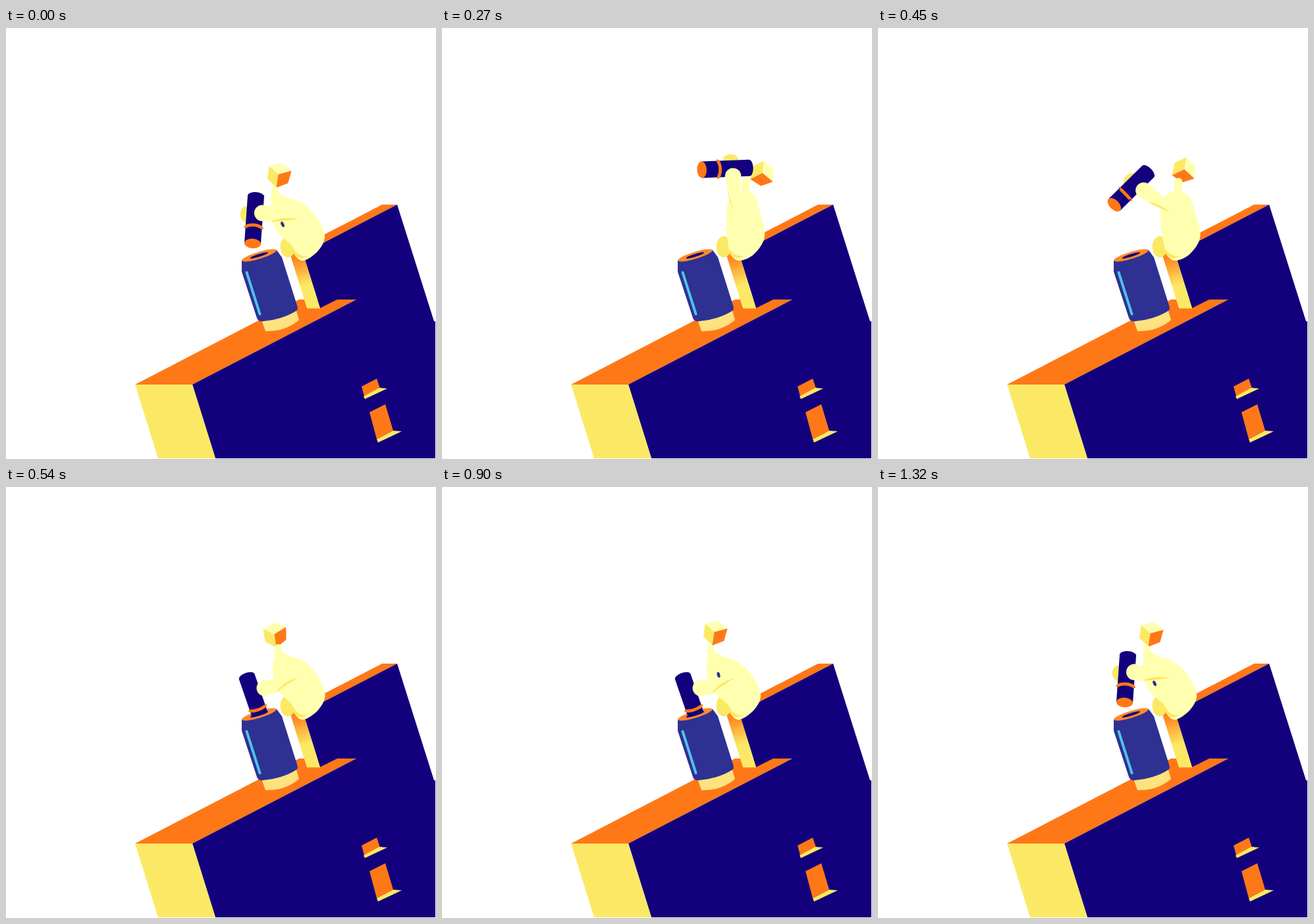
Recreate the animation shown at these times as an HTML page. Size 653x654 px, loop 1800 ms.

```html
<!DOCTYPE html>
<html lang="en">
<head>
<meta charset="utf-8">
<title>Hand and can</title>
<style>
  html, body { margin: 0; width: 100%; height: 100%; overflow: hidden; background: #fff; }
  svg { display: block; width: 100vw; height: 100vh; }
  .navy { fill: #13007c; }
  .orange { fill: #ff7817; }
  .yellow { fill: #fbe965; }
  .light { fill: #ffffb0; }
</style>
</head>
<body>
<svg viewBox="0 0 653 654" preserveAspectRatio="none">
  <defs>
    <linearGradient id="glow" gradientUnits="userSpaceOnUse" x1="440" y1="352" x2="452" y2="392">
      <stop offset="0" stop-color="#ff8a20"/>
      <stop offset="1" stop-color="#fbe965"/>
    </linearGradient>
    <clipPath id="aboveSlot">
      <path d="M300 150H560V300L398 340Q387 348 371 349L300 360Z"/>
    </clipPath>
  </defs>

  <!-- blocks -->
  <path class="orange" d="M571 268H594L451 342L432 340ZM196 541L445 412H532L283 541Z"/>
  <path class="navy" d="M451 342L594 268L650 445H652V653H318L283 541L532 412H503L477 425Z"/>
  <path class="yellow" d="M196 541H283L318 653H231Z"/>
  <path fill="url(#glow)" d="M431 342H451L477 425.500H457Z"/>
  <path class="orange" d="M540 544L563 532L568 547L544 559ZM552 583L576 571L588 611L563 624Z"/>
  <path class="yellow" d="M543 559L567 546L579 547L545 563ZM563 624L588 611L601 612L565 629Z"/>

  <!-- can -->
  <path fill="#fde27f" d="M388 443L394 460Q424 461 445 443L440 426Z"/>
  <path fill="#2e3192" d="M358 353V370L381 440Q383 446 390 445Q421 442 441 429Q444 427 442 421L419 348L411 337Z"/>
  <g transform="translate(384.500 345) rotate(-17)">
    <ellipse rx="27.500" ry="5.300" fill="#ff8a2c"/>
    <ellipse class="navy" rx="14.300" ry="2.200"/>
  </g>
  <path d="M365.500 371L385.500 434" stroke="#4fc3e8" stroke-width="4" stroke-linecap="round"/>

  <g id="cube">
    <path id="cubeTop" class="light"/>
    <path id="cubeLeft" class="yellow"/>
    <path id="cubeRight" class="orange"/>
  </g>

  <!-- pen with thumb behind it -->
  <g clip-path="url(#aboveSlot)">
    <g id="pen">
      <ellipse id="thumb" class="yellow" cx="-8" rx="12" ry="9.500"/>
      <path class="navy" d="M-36 -12.500H36V12.500H-36A6 12.500 0 0 1 -36 -12.500Z"/>
      <path id="band" fill="none" stroke="#ff7817" stroke-width="4.800"/>
      <ellipse class="orange" cx="36" rx="7.300" ry="12.500"/>
    </g>
  </g>

  <!-- hand -->
  <ellipse class="yellow" cx="428" cy="332" rx="11.500" ry="16"/>
  <path id="stalk" class="light"/>
  <path id="palm" class="light"/>
  <path id="finger" class="light"/>
  <path id="crease" class="yellow"/>
  <path class="yellow" d="M437 334Q442 347 458 346Q446 353 439 345Q436 341 437 334Z"/>
  <ellipse id="gap" fill="#2e3192"/>
</svg>

<script>
const LOOP = 1800, STEP = 30;
const $ = id => document.getElementById(id);
const mix = (a, b, u) => a + (b - a) * u;
const mixAll = (a, b, u) => a.map((v, i) => mix(v, b[i], u));

// Smooth 0 to 1 between two times.
function ramp(t, from, to) {
  const u = Math.min(1, Math.max(0, (t - from) / (to - from)));
  return u * u * (3 - 2 * u);
}

// Key poses: x, y, angle.
const ready = [377, 291, 94], down = [377.5, 322, 71];
const penKeys = [
  [0, ...ready], [150, 409, 222.5, 155.5], [310, 433, 213, 180], [450, 384.5, 243, 135.5],
  [540, ...down], [1050, ...down], [1320, ...ready]
];
const cubeKeys = [
  [0, 414.5, 223, 0], [150, 463.5, 220.5, 33], [360, 494, 222, 62], [450, 465, 216, 57],
  [615, 379, 230, -70], [900, 414.5, 221, 0], [1050, 414.5, 221, 0], [1320, 414.5, 223, 0]
];

// Monotone curve through the keys, resting at turning points.
function sample(keys, t) {
  const i = keys.findLastIndex(key => key[0] <= t);
  const from = keys[i], to = keys[i + 1];
  if (!to) return from.slice(1);
  const slope = (k, c) => keys[k] && keys[k + 1]
    ? (keys[k + 1][c] - keys[k][c]) / (keys[k + 1][0] - keys[k][0]) : 0;
  const tangent = (k, c) => {
    const a = slope(k - 1, c), b = slope(k, c);
    return a * b > 0 ? 2 * a * b / (a + b) : 0;
  };
  const span = to[0] - from[0], u = (t - from[0]) / span;
  return [1, 2, 3].map(c => mix(from[c], to[c], ramp(u, 0, 1))
    + span * u * (1 - u) * ((1 - u) * tangent(i, c) - u * tangent(i + 1, c)));
}

// Palm outline at rest and raised, above a fixed wrist.
const wrist = [452,353, 439,345, 435,331];
const restPalm = [403,264, 413,251, 428,258, 449,265, 471,286, 484,315, 474,338, ...wrist, 415,313, 403,289];
const raisedPalm = [434,264, 445,250, 461,247, 475,254, 482,276, 490,316, 474,343, ...wrist, 432,307, 432,283];

// Closed smooth curve through a flat list of points.
function blob(p) {
  const n = p.length / 2;
  const at = i => [p[2 * ((i + n) % n)], p[2 * ((i + n) % n) + 1]];
  let d = `M${at(0)}`;
  for (let i = 0; i < n; i++) {
    const a = at(i - 1), b = at(i), c = at(i + 1), e = at(i + 2);
    d += `C${b.map((v, k) => v + (c[k] - a[k]) / 6)} ${c.map((v, k) => v - (e[k] - b[k]) / 6)} ${c}`;
  }
  return d + 'Z';
}

// Round tip narrowing or widening towards its base.
function taper(x, y, r, bx, by, br) {
  const angle = Math.atan2(by - y, bx - x);
  const nx = -Math.sin(angle), ny = Math.cos(angle);
  return `M${x + nx * r} ${y + ny * r}A${r} ${r} 0 0 1 ${x - nx * r} ${y - ny * r}`
    + `L${bx - nx * br} ${by - ny * br}A${br} ${br} 0 0 1 ${bx + nx * br} ${by + ny * br}Z`;
}

// Point at distances along and across a direction.
function offset(x, y, angle, along, across) {
  const c = Math.cos(angle), s = Math.sin(angle);
  return [x + along * c - across * s, y + along * s + across * c];
}

function place(id, x, y, angle) {
  $(id).setAttribute('transform', `translate(${x} ${y}) rotate(${angle})`);
}
const shape = (id, d) => $(id).setAttribute('d', d);

// The cube is a hexagon split into three faces around its near corner.
const corner = k => offset(0, 0, (222 + 60 * k) * Math.PI / 180, k % 2 ? 18.5 : 20, 0);
['cubeTop', 'cubeRight', 'cubeLeft'].forEach((id, i) =>
  shape(id, `M-1 -1L${corner(2 * i)}L${corner(2 * i + 1)}L${corner(2 * i + 2)}Z`));

function draw(t) {
  const raise = ramp(t, 0, 270) - ramp(t, 420, 570);
  const twist = ramp(t, 360, 540) - ramp(t, 1050, 1320);
  const open = 1 - ramp(t, 0, 75) + ramp(t, 600, 780);
  const [px, py, tilt] = sample(penKeys, t);

  place('cube', ...sample(cubeKeys, t));
  place('pen', px, py, tilt);
  $('thumb').setAttribute('cy', 12.5 * (1 - twist * twist));
  const bend = mix(5, -4, twist);
  shape('band', `M13 -12.5A${Math.abs(bend)} 12.5 0 0 ${bend > 0 ? 0 : 1} 13 12.5`);

  // The fingertip holds the pen; the knuckle stays with the palm.
  const [fx, fy] = offset(px, py, tilt * Math.PI / 180, -11, mix(-11.5, -20, twist));
  const kx = mix(413, 444, raise), ky = mix(286, 261, raise) + 17 * twist;
  shape('finger', taper(fx, fy, 12.3, kx, ky, mix(9.5, 6.5, raise)));

  const [sx, sy] = offset(fx, fy, Math.atan2(ky - fy, kx - fx), 15, 10.5);
  const ex = 444, ey = mix(290, 278, raise);
  const mx = (sx + ex) / 2 - 4, my = (sy + ey) / 2;
  shape('crease', `M${sx} ${sy}Q${mx} ${my - 7} ${ex} ${ey}Q${mx} ${my + 1} ${sx} ${sy}Z`);

  shape('palm', blob(mixAll(restPalm, raisedPalm, raise)));
  shape('stalk', taper(...mixAll([408, 245, 5, 410, 262, 7], [462, 232, 6, 460, 252, 6], raise)));

  place('gap', 420, mix(298, 285, twist), mix(-25, -15, twist));
  $('gap').setAttribute('rx', 2.3 * Math.min(1, open * 2));
  $('gap').setAttribute('ry', 4.4 * open);
}

const start = performance.now();
function tick() {
  const t = (performance.now() - start) % LOOP;
  draw(Math.floor(t / STEP) * STEP);
  requestAnimationFrame(tick);
}
tick();
</script>
</body>
</html>
```
